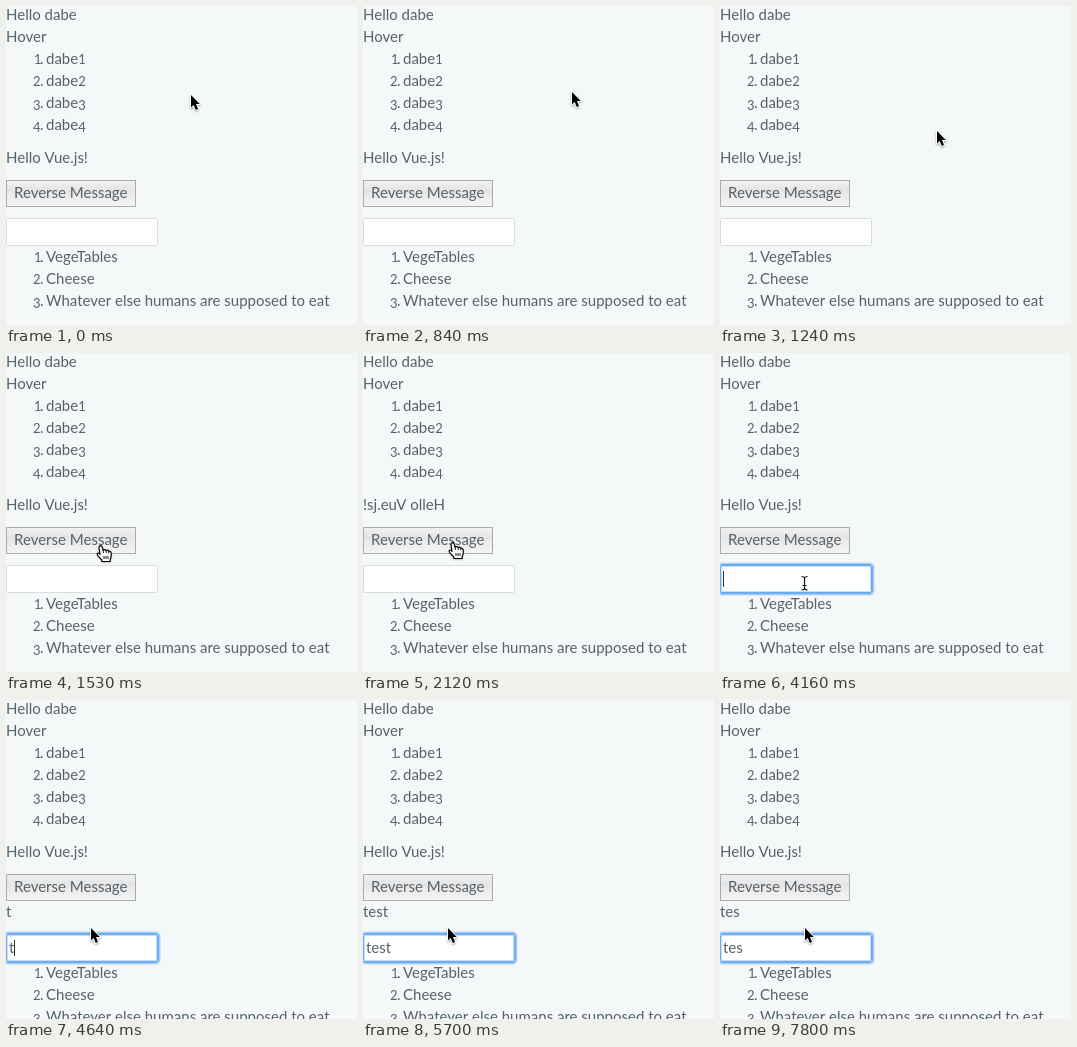
These frames come from a looping animation (351x319 px, 8000 ms). An HTML page with a canvas:

```html
<!DOCTYPE html>
<html lang="en">
<head>
<meta charset="utf-8">
<title>Form demo</title>
<style>
  html, body { margin: 0; width: 100%; height: 100%; overflow: hidden; background: #f4f8f9; }
  canvas { display: block; width: 351px; height: 319px; }
</style>
</head>
<body>
<canvas id="stage"></canvas>
<script>
const W = 351, H = 319, LOOP = 8000;
const INK = '#56616a';
const FONT = 'Lato, "Open Sans", sans-serif';
const canvas = document.getElementById('stage');
const ratio = window.devicePixelRatio || 1;
canvas.width = W * ratio;
canvas.height = H * ratio;
const ctx = canvas.getContext('2d');

const NAME = 'dabe';
const GREETING = 'Hello Vue.js!';
const FOODS = ['VegeTables', 'Cheese', 'Whatever else humans are supposed to eat'];

// Steps: [start, value]; the last one already started applies.
const TYPED = [[0, ''], [4640, 't'], [4755, 'te'], [4870, 'tes'], [5220, 'test'], [7020, 'test '], [7800, 'tes']];
const CARET = [[0, false], [4160, true], [5700, false], [6240, true], [6720, false], [7020, true], [7500, false]];

// Pointer moves; keys are [step, x, y].
const MOVES = [
  { start: 660, end: 1700, steps: 18, keys: [
    [0, 186, 87], [3, 208, 85], [5, 224, 88], [7, 231, 97], [9, 226, 112], [10, 216, 124],
    [11, 186, 150], [12, 136, 184], [13, 105, 197], [15, 96, 192], [18, 91, 189]] },
  { start: 3440, end: 3860, steps: 7, keys: [
    [0, 90, 194], [1, 87, 203], [2, 85, 211], [4, 84, 222], [7, 84, 230]] }
];

function valueAt(list, t) {
  let value = list[0][1];
  for (const [start, v] of list) if (t >= start) value = v;
  return value;
}

function pointerAt(t) {
  let pos = [184, 88];
  for (const { start, end, steps, keys } of MOVES) {
    if (t < start) break;
    const step = Math.min(steps, Math.floor((t - start + 3) / (end - start) * steps));
    const i = Math.max(1, keys.findIndex(k => k[0] >= step));
    const [s0, x0, y0] = keys[i - 1], [s1, x1, y1] = keys[i];
    const f = (step - s0) / (s1 - s0);
    pos = [Math.round(x0 + (x1 - x0) * f), Math.round(y0 + (y1 - y0) * f)];
  }
  return pos;
}

// Draws a string and returns the x where it ends.
function text(str, x, y, size = 15) {
  ctx.font = size + 'px ' + FONT;
  ctx.fillStyle = INK;
  ctx.fillText(str, x, y);
  return x + ctx.measureText(str).width;
}

// Old-style figures: 3 and 4 hang a little below the line.
function digit(n, x, y) {
  text(n, x, n < 3 ? y : y + 1.5, 13);
}

function item(n, str, y) {
  digit(n, n === 1 ? 28 : 27, y);
  text('.', 34, y);
  return text(str, 40, y);
}

function button() {
  const fill = ctx.createLinearGradient(0, 174, 0, 201);
  fill.addColorStop(0, '#f2f2f2');
  fill.addColorStop(0.4, '#e4e4e4');
  fill.addColorStop(0.5, '#e9e9e9');
  fill.addColorStop(1, '#f5f5f5');
  ctx.fillStyle = fill;
  ctx.fillRect(0, 174, 130, 27);
  ctx.lineWidth = 1;
  ctx.strokeStyle = '#a9acad';
  ctx.strokeRect(0.5, 174.5, 129, 26);
  text('Reverse Message', 8, 192);
}

function ring(inset, y, color) {
  ctx.strokeStyle = color;
  ctx.beginPath();
  ctx.roundRect(inset, y + inset, 152 - 2 * inset, 28 - 2 * inset, Math.max(0.5, 2 - inset));
  ctx.stroke();
}

function field(y, focused, str, caret) {
  ctx.fillStyle = '#fff';
  ctx.fillRect(0, y, 152, 28);
  ctx.lineWidth = 1;
  if (focused) {
    ring(-2.5, y, 'rgba(110,175,245,.22)');
    ring(-1.5, y, 'rgba(105,172,245,.55)');
    ring(-0.5, y, 'rgba(98,166,242,.9)');
    ring(0.5, y, '#6aaaf0');
    ring(1.5, y, 'rgba(130,185,245,.45)');
  } else {
    ring(0.5, y, '#dadddf');
  }
  const end = text(str, 3, y + 19);
  if (caret) {
    ctx.fillStyle = '#333';
    ctx.fillRect(Math.floor(end), y + 6, 1, 16);
  }
}

const ARROW = new Path2D('M1 1 V13.4 L3.7 10.9 L5.8 15.9 L8 15 L6 10.1 H9.8 Z');
const HAND = new Path2D('M-2 9.4 L-3 3 Q-3.2 .8 -1.6 .6 Q-.2 .6 .3 2.2 L1 5 Q2.8 3.9 4 5.3 ' +
  'Q5.6 4.6 6.7 6.2 Q8.8 5.8 9.2 8 V11 Q9.1 13 8.2 14.4 V16.5 H-.2 V15 ' +
  'Q-2.4 13 -4.6 10 Q-5.3 8.4 -4 8 Q-2.8 7.9 -2 9.4 Z');
const CREASES = new Path2D('M1 5 L1.5 8 M4 5.3 L4.3 8 M6.7 6.2 V8.4 M2 11 V14 M4 11 V14 M6 11 V14');
const BEAM = new Path2D('M-2.5 -6.5 Q0 -6.5 .5 -5 Q1 -6.5 3.5 -6.5 M.5 -5 V5.5 ' +
  'M-2.5 7 Q0 7 .5 5.5 Q1 7 3.5 7 M-1.5 2.5 H2.5');

function shadow(on) {
  ctx.shadowColor = on ? 'rgba(0,0,0,.35)' : 'transparent';
  ctx.shadowBlur = on ? 2 * ratio : 0;
  ctx.shadowOffsetY = on ? ratio : 0;
}

function drawArrow() {
  ctx.lineWidth = 2;
  ctx.strokeStyle = '#fff';
  shadow(true);
  ctx.stroke(ARROW);
  shadow(false);
  ctx.fillStyle = '#000';
  ctx.fill(ARROW);
}

function drawHand() {
  ctx.fillStyle = '#fff';
  shadow(true);
  ctx.fill(HAND);
  shadow(false);
  ctx.strokeStyle = '#000';
  ctx.lineWidth = 1.2;
  ctx.stroke(HAND);
  ctx.lineWidth = 0.9;
  ctx.stroke(CREASES);
}

function drawBeam() {
  ctx.strokeStyle = '#111';
  ctx.lineWidth = 1.2;
  ctx.stroke(BEAM);
}

function pointer(t, fieldY) {
  const [x, y] = pointerAt(t);
  const overButton = x < 130 && y >= 174 && y < 201;
  const overField = x < 152 && y >= fieldY && y < fieldY + 28;
  ctx.save();
  ctx.lineJoin = 'round';
  if (overButton) {
    ctx.translate(x, y);
    drawHand();
  } else if (overField) {
    ctx.translate(x, y);
    drawBeam();
  } else {
    ctx.translate(x, fieldY > 212 ? y - 3 : y);
    drawArrow();
  }
  ctx.restore();
}

function draw(t) {
  ctx.setTransform(ratio, 0, 0, ratio, 0, 0);
  ctx.fillStyle = '#f4f8f9';
  ctx.fillRect(0, 0, W, H);

  text('Hello ' + NAME, 0, 14);
  text('Hover', 0, 36);
  for (let n = 1; n <= 4; n++) {
    const y = 36 + 22 * n;
    digit(n, item(n, NAME, y), y);
  }

  const reversed = t >= 2120 && t < 3080;
  text(reversed ? [...GREETING].reverse().join('') : GREETING, 0, 157);
  button();

  const typed = valueAt(TYPED, t);
  const shift = typed ? 22 : 0;
  if (typed) text(typed, 0, 217);
  field(212 + shift, t >= 4160, typed, valueAt(CARET, t));
  FOODS.forEach((food, i) => item(i + 1, food, 256 + shift + 22 * i));
  pointer(t, 212 + shift);
}

const begin = performance.now();
function frame() {
  draw((performance.now() - begin) % LOOP);
  requestAnimationFrame(frame);
}
frame();
</script>
</body>
</html>
```
